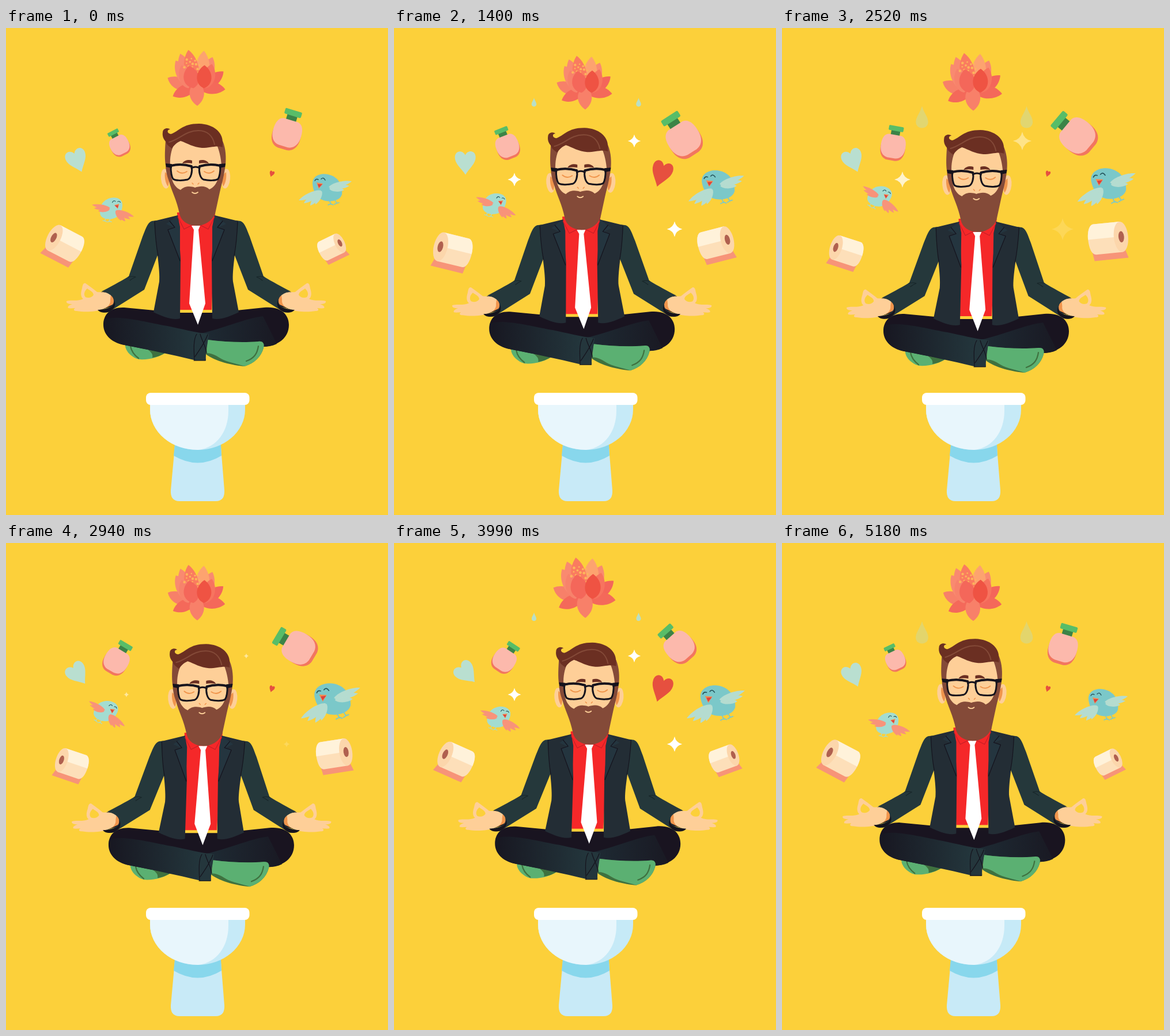
Recreate the animation shown at these times as an HTML page with a canvas. Size 663 by 845 pixels, loop 5.25 s.

```html
<!DOCTYPE html>
<html lang="en">
<head>
<meta charset="utf-8">
<title>Levitation</title>
<style>
html, body { margin: 0; width: 100%; height: 100%; overflow: hidden; background: #fcd03a; }
canvas { display: block; width: 100vw; height: 100vh; }
</style>
</head>
<body>
<canvas id="stage" width="663" height="845"></canvas>
<script>
const ctx = document.getElementById('stage').getContext('2d');
const LOOP = 5250, STEP = 70, CYCLE = LOOP / 2;
const TIMES = [0, 840, 1960, 2520, 3430, 4480];
const INK = '#15131d', SKIN = '#fecf98', BEARD = '#844a38', HAIR = '#6b2f22', ORANGE = '#f0954c';

// Smooth periodic curve through the given values.
function track(vals, times = TIMES) {
  const n = vals.length;
  const time = i => times[(i + n) % n] + Math.floor(i / n) * LOOP;
  const val = i => vals[(i + n) % n];
  const slope = i => (val(i + 1) - val(i - 1)) / (time(i + 1) - time(i - 1));
  return t => {
    let i = n - 1;
    while (time(i) > t) i--;
    const d = time(i + 1) - time(i), u = (t - time(i)) / d, u2 = u * u, u3 = u2 * u;
    return (2 * u3 - 3 * u2 + 1) * val(i) + (u3 - 2 * u2 + u) * d * slope(i)
      + (3 * u2 - 2 * u3) * val(i + 1) + (u3 - u2) * d * slope((i + 1) % n);
  };
}

const clamp = v => Math.max(0, Math.min(1, v));
const smooth = (a, b, v) => { const u = clamp((v - a) / (b - a)); return u * u * (3 - 2 * u); };

function fill(d, color, rule = 'nonzero') {
  ctx.fillStyle = color;
  ctx.fill(new Path2D(d), rule);
}

function line(d, color, width = 1.3) {
  ctx.strokeStyle = color;
  ctx.lineWidth = width;
  ctx.lineCap = ctx.lineJoin = 'round';
  ctx.stroke(new Path2D(d));
}

function oval(x, y, rx, ry, color, turn = 0) {
  ctx.fillStyle = color;
  ctx.beginPath();
  ctx.ellipse(x, y, rx, ry, turn, 0, 7);
  ctx.fill();
}

function petal(x0, y0, x1, y1, w, color) {
  const dx = x1 - x0, dy = y1 - y0, len = Math.hypot(dx, dy);
  const nx = -dy / len * w, ny = dx / len * w;
  const at = (u, s) => [x0 + dx * u + nx * s, y0 + dy * u + ny * s];
  ctx.fillStyle = color;
  ctx.beginPath();
  ctx.moveTo(x0, y0);
  ctx.bezierCurveTo(...at(.15, 1), ...at(.7, 1.1), x1, y1);
  ctx.bezierCurveTo(...at(.7, -1.1), ...at(.15, -1), x0, y0);
  ctx.fill();
}

function place(x, y, deg, sx, sy, draw) {
  ctx.save();
  ctx.translate(x, y);
  ctx.rotate(deg * Math.PI / 180);
  ctx.scale(sx, sy);
  draw();
  ctx.restore();
}

function bothSides(axis, draw) {
  draw();
  place(2 * axis, 0, 0, -1, 1, draw);
}

function ramp(x0, c0, x1, c1) {
  const g = ctx.createLinearGradient(x0, 0, x1, 0);
  g.addColorStop(0, c0);
  g.addColorStop(1, c1);
  return g;
}

// ---- props -------------------------------------------------------------

function toilet() {
  fill('M294 715L286 802Q285 821 301 821H364Q380 821 379 802L372 715Z', '#c8eaf7');
  fill('M293 722H373L374 742Q333 767 291 742Z', '#88d7ec');
  fill('M250 650H415V662A82.5 70 0 0 1 250 662Z', '#c6eaf7');
  fill('M250 650H386V664C386 700 366 728 334 732A82.5 70 0 0 1 250 662Z', '#e8f6fc');
  ctx.fillStyle = '#fff';
  ctx.beginPath();
  ctx.roundRect(243, 633, 179.5, 21, 8);
  ctx.fill();
}

function lotus() {
  petal(-10, 10, -28, -30, 13, '#f98a70');
  petal(10, 12, 28, -36, 15, '#f98b70');
  petal(8, 12, 13, -47, 16, '#fda36f');
  petal(-10, 14, -28, -42, 15, '#f98a70');
  petal(-4, 12, -14, -48.5, 16, '#fa7c5f');
  petal(12, 18, 47, -11, 13, '#f4665a');
  petal(-14, 18, -50, 0, 13, '#f78069');
  petal(-10, 16, -36, -30, 15, '#f98a70');
  petal(-2, 14, -41, 32, 13, '#f4695a');
  petal(2, 14, 50, 20, 14, '#f4695a');
  petal(0, 8, 1.5, 48.5, 16, '#f88069');
  petal(16, 18, 27, -24, 14, '#f7745f');
  petal(-14, 18, -26, -22, 13, '#f7826b');
  for (let i = 0; i < 22; i++) {
    const a = i * 2.4, r = 3.4 * Math.sqrt(i);
    oval(-7 + r * Math.cos(a), -19 + r * 1.1 * Math.sin(a), 1.3 + i % 3 * .45, 1.3 + i % 3 * .45, '#fdb45c');
  }
  petal(-5, 18, -13, -21, 17, '#f4675a');
  petal(13, 18, 14, -22, 16, '#ef5343');
}

function bottle() {
  const body = 'M-13 -23H13C22 -21 25 -12 25 0C25 15 18 23 8 24H-8C-18 23 -25 15 -25 0C-25 -12 -22 -21 -13 -23Z';
  place(0, 5, 0, 1, 1, () => fill(body, '#f2765f'));
  fill('M-9 -32H9V-22H-9Z', '#3c8347');
  fill(body, '#fcb9ac');
  ctx.fillStyle = '#58bd68';
  ctx.beginPath();
  ctx.roundRect(-15, -41, 30, 10, 2);
  ctx.fill();
}

function heart(color) {
  fill('M0 21C-7 10 -18 2 -18 -9C-18 -21 -5 -23 0 -13C5 -23 18 -21 18 -9C18 2 7 10 0 21Z', color);
}

function star(x, y, r, alpha) {
  if (alpha <= 0) return;
  ctx.globalAlpha = clamp(alpha);
  place(x, y, 0, r, r, () => fill('M0 -1Q.18 -.18 1 0Q.18 .18 0 1Q-.18 .18 -1 0Q-.18 -.18 0 -1Z', '#fff'));
  ctx.globalAlpha = 1;
}

function drop(x, y, h, alpha) {
  ctx.globalAlpha = clamp(alpha);
  place(x, y, 0, h, h, () => fill('M0 -.5C.08 -.2 .28 0 .28 .23C.28 .4 .15 .5 0 .5C-.15 .5 -.28 .4 -.28 .23C-.28 0 -.08 -.2 0 -.5Z', '#b9dfc6'));
  ctx.globalAlpha = 1;
}

function roll() {
  fill('M-24 12L-29 28H26L29 8Z', '#f79478');
  fill('M-20 -31H22C29 -31 33 -20 33 -7C33 8 29 18 22 18H-20Z', '#fddfb9');
  fill('M-20 -31H22C29 -31 33 -20 33 -7H-20Z', '#fff2da');
  oval(-20, -6.5, 11.5, 24.5, '#fcd6ab');
  oval(-20.5, -6.5, 4.5, 9, '#b0604f');
}

function bird(body, wing) {
  line('M4 21L7 29M2 30L7 28L11 30M13 19L17 27M13 29L17 27L21 26', body, 1.6);
  fill('M-25 -6C-26 -20 -12 -26 2 -23C20 -19 28 -4 26 12C23 22 8 26 -6 22C-18 18 -24 6 -25 -6Z', body);
  petal(4, 2, 30, 4, 5, wing);
  petal(4, 0, 39, -3, 5, wing);
  petal(3, -1, 43, -11, 5.5, wing);
  petal(-10, 5, -49, 22, 6, wing);
  petal(-10, 6, -40, 27, 6, wing);
  petal(-9, 6, -29, 31, 6, wing);
  petal(-9, 6, -20, 29, 5, wing);
  line('M-21 -12Q-19 -16 -15 -14M-10 -15Q-6 -19 -3 -13', '#25545c', 1.4);
  fill('M-18 -9L-7 -7L-14 2Z', '#f58a4e');
  fill('M-16 -6L-8 -6L-14 0Z', '#dc3f3e');
}

// ---- the man -----------------------------------------------------------

function legs() {
  fill('M207 549C206 560 218 572 231 575C250 576 265 571 279 562L215 546Z', '#5bb072');
  fill('M224 551C225 560 240 566 252 573C262 571 270 568 279 562L240 549Z', '#5bb072');
  fill('M240 554L279 562C270 568 262 571 254 572C256 565 250 560 240 554Z', '#3f713f');
  line('M216 552Q218 564 230 573', '#3f713f', 2.2);
  fill('M169 515C169 496 182 484 205 485L300 494H362L448 485C478 482 491 498 491 515C491 538 472 552 446 553L436 546L352 545L330 574L205 550C180 545 169 530 169 515Z', '#191420');
  fill('M338 530C375 522 415 504 446 500L470 548C462 552 454 553 446 553L436 546L352 546Z',
    ramp(345, '#1e2a33', 480, '#191822'));
  fill('M170 506C190 496 245 511 280 517C305 522 325 528 352 531L345 577L326 576C290 567 245 558 206 550C180 545 168 528 170 506Z',
    ramp(175, '#181822', 340, '#24383e'));
  fill('M350 541C380 545 412 546 438 544C446 543 449 548 447 555C443 570 431 582 414 587C395 586 362 578 347 566Z', '#3f713f');
  fill('M350 541C380 545 412 546 438 544C446 543 449 548 447 555C443 570 431 582 414 587C400 582 384 580 372 573C363 567 355 564 348 564Z', '#5bb072');
  line('M438 552C436 565 431 573 417 578', '#3f713f', 2.2);
  fill('M326 535C333 528 343 529 352 531C350 548 346 562 347 577H327C325 562 325 548 326 535Z', '#24363c');
  line('M331 531C325 540 326 558 327 576M350 532C345 546 335 560 328 570M337 531C340 543 347 552 348 564M326 577H346', INK, 1.2);
}

function arm() {
  fill('M165 458C182 455 192 467 187 482L164 489Z', INK);
  fill('M172 457C184 460 189 469 187 479L172 486Z', ORANGE);
  fill('M182 463C174 456 165 459 158 458C152 453 145 448 138 443C134 442 133 446 132 452C129 461 130 467 134 470C124 475 113 471 105 474C104 477 108 479 115 479C110 481 106 483 108 486C112 487 116 486 120 486C116 489 118 491 123 491C135 493 155 493 167 488C176 485 182 480 181 471Z'
    + 'M141 452C136 456 134 463 138 467C143 469 149 468 152 463C151 457 146 456 141 452Z', SKIN, 'evenodd');
  fill('M253 335C245 338 242 350 237 362L213 431C198 440 180 450 166 457C178 459 188 466 187 474C187 483 175 488 160 489C165 494 172 494 178 493L240 454L264 392L261 334Z', '#25383b');
  fill('M187 471C191 482 179 489 159 489C164 495 174 495 181 491C190 486 191 478 187 471Z', INK);
  line('M212 432Q219 430 225 432M215 438Q220 434 225 432', '#182629', 1.1);
}

function torso() {
  fill('M297 320H363L357 489H302Z', '#f52829');
  bothSides(330, () => {
    arm();
    fill('M298 325L257 335C260 380 268 420 266 440L256 493C270 500 290 508 302 504L303 400Z', '#232d35');
    line('M258 336C259 360 261 380 264 395', INK, 1.1);
    fill('M298 325L278 340L291 346L281 350L302 405L302 345Z', '#24353f');
    line('M284 335L293 346L281 350L302 404', INK, 1.2);
    fill('M299 320L309 349L324 342L312 332Z', '#f52829');
    line('M298 328L309 349L323 342', '#c41f28', 1.1);
  });
  fill('M322 343H337L334 350L346 478L333 515L318 478L326 350Z', '#fff');
}

function head() {
  bothSides(329, () => {
    oval(276.5, 261.5, 7.5, 17, SKIN, -.1);
    fill('M276 250C283 255 285 265 281 275C276 268 275 258 276 250Z', ORANGE);
  });
  fill('M280 205C300 185 355 190 377 205L376 255C370 280 350 290 328 290C308 290 286 280 282 255Z', SKIN);
  fill('M277 194C276 210 275 225 277 238L285 238C284 225 287 212 291 203ZM376 196C382 210 382 225 381 238L374 238C373 225 370 212 366 203Z', BEARD);
  fill('M277 236L285 236C285 256 288 274 303 281C310 274 320 274 328 277C336 274 346 273 353 280C367 274 371 256 373 236L381 236C379 255 375 268 371 285L363 322C357 336 344 343 330 343C314 342 304 335 301 322C297 300 287 282 283 266C279 256 277 246 277 236Z', BEARD);
  line('M323 285Q328 289 333 285', SKIN, 1.8);
  fill('M272 181C272 174 281 172 285 176C279 176 279 183 286 184C300 180 305 166 335 166C361 167 376 181 376 198L376 207C366 203 355 208 340 208C325 207 315 200 303 196C296 199 291 204 288 209C283 205 278 202 278 198C273 193 271 187 272 181Z', HAIR);
  line('M283 198C302 193 312 178 334 178C350 178 359 188 362 202', BEARD, 2);
  line('M323 269L325 271M335 269L333 271', ORANGE, 1.5);
  bothSides(329, () => {
    fill('M306 235C309 229 318 228 323 230V235C318 234 312 234 306 235Z', HAIR);
    line('M297 248Q305 255 314 249', ORANGE, 1.8);
    line('M286 239C298 236 312 237 322 240C324 249 321 261 315 263C306 265 294 265 290 262C286 256 286 247 286 239Z', INK, 3);
    line('M286 239C298 236 312 237 322 240', INK, 4);
    fill('M277 235L288 236V243L278 241Z', INK);
  });
  line('M322 243Q329 239 336 243', INK, 3);
}

// ---- motion ------------------------------------------------------------

const bodyX = track([0, -5.5, 0, 7, 9.2, 3]);
const headX = track([0, -6, -.8, 9.3, 13, 5]);
const bodyY = track([0, 1.6, 3.5, 5.5, 8.8, 11, 10.2, 5.4, 6.8, 4.2],
  [0, 560, 840, 1120, 1680, 2250, 2800, 3430, 3950, 4480]);
const lotusY = track([86.5, 90.5, 98, 93.5, 78, 77.5, 82.5], [0, 840, 1960, 2520, 3430, 3980, 4480]);
const lotusSize = track([1, .86, 1.08, 1.03, .98, 1.15]);

const mover = (x, y, deg, size) => [x, y, deg, size].map(v => track(v));
const bottleR = mover([488, 500, 505, 513, 500, 492], [182, 190, 192, 187, 178, 182],
  [17, -20, -42, -50, -63, -17], [1, 1.1, 1.18, 1.16, 1.02, 1]);
const bottleL = mover([197, 197, 196, 193, 191, 193], [203, 204, 205, 205, 203, 203],
  [-27, -25, -14, 10, 46, 13], [.67, .74, .85, .86, .83, .74]);
const heartL = mover([123.5, 123.5, 124, 123.5, 126, 125], [230, 232, 234, 230, 225, 227.5],
  [-22, -7, 0, -22, -48, -34], [1, 1, 1, 1, 1, 1]);
const rollL = mover([98, 97.5, 103, 109, 112, 97.5], [379, 387, 394, 392, 383, 379],
  [27.5, 17, 12.8, 18, 19.6, 27.5], [1, 1.05, 1.01, .9, .9, 1.02]);
const rollR = mover([568, 560, 563.5, 567.5, 575, 574], [384, 381.5, 375, 371.5, 374, 382],
  [-26, -20, -8.7, -5.8, -14, -25], [.74, .84, 1.1, 1.08, .85, .77]);
const birdR = mover([557, 558, 566, 566, 565, 558], [277, 275, 270, 270, 272, 275],
  [0, -2.7, -6.6, -6.2, -8.7, -2.6], [1, 1.05, 1.12, 1.15, 1.2, 1.08]);
const birdL = mover([183, 179, 171, 170, 179, 184], [313, 310, 299, 292, 294, 309],
  [-4, -1, 11, 16, 12, -1.4], [.775, .775, .775, .775, .775, .77]);

function put(m, t, flip, draw) {
  const [x, y, deg, s] = m.map(f => f(t));
  place(x, y, deg, s * flip, s, draw);
}

function man(t) {
  const x = bodyX(t), y = bodyY(t), hx = headX(t), lean = (hx - x) / 150;
  place(x, y, 0, 1, 1, () => {
    legs();
    ctx.transform(1, 0, -lean, 1, lean * 490, 0);
    torso();
  });
  place(hx, y, 0, 1, 1, head);
}

function twinkles(f) {
  const r = 17 * f ** .6;
  star(417, 196, r * .97, Math.min((f - .06) / .12, (.972 - f) / .03));
  star(209, 263, Math.min(r, 14), Math.min((f - .06) / .12, (.972 - f) / .016));
  star(487, 349, r * 1.15, Math.min((f - .06) / .35, (.972 - f) / .08));
  const h = Math.max(0, (f - .27) * 55) + (f > .29 ? 2 * clamp((.6 - f) * 5) : 0);
  if (h > 0) for (const x of [243, 424.5]) drop(x, 116 + (f - .32) * 60, h, 1 - (f - .75) * 2.85);
}

function render(t) {
  const f = t % CYCLE / CYCLE;
  ctx.fillStyle = '#fcd03a';
  ctx.fillRect(0, 0, 663, 845);
  toilet();
  man(t);
  place(330.5, lotusY(t), 0, lotusSize(t), lotusSize(t), lotus);
  put(bottleL, t, 1, bottle);
  put(bottleR, t, 1, bottle);
  put(heartL, t, 1, () => heart('#b9dfd0'));
  const beat = .26 + .85 * smooth(.08, .5, f) * (1 - smooth(.64, .88, f));
  place(463.5 - 3 * (1 - beat), 253, 18, beat * .9, beat, () => heart('#e6503f'));
  put(rollL, t, 1, roll);
  put(rollR, t, -1, roll);
  put(birdL, t, -1, () => bird('#a3dcd1', '#f8937a'));
  put(birdR, t, 1, () => bird('#7bc8c9', '#b5dcd0'));
  twinkles(f);
}

function tick() {
  render(Math.floor(performance.now() % LOOP / STEP) * STEP);
  requestAnimationFrame(tick);
}
tick();
</script>
</body>
</html>
```
